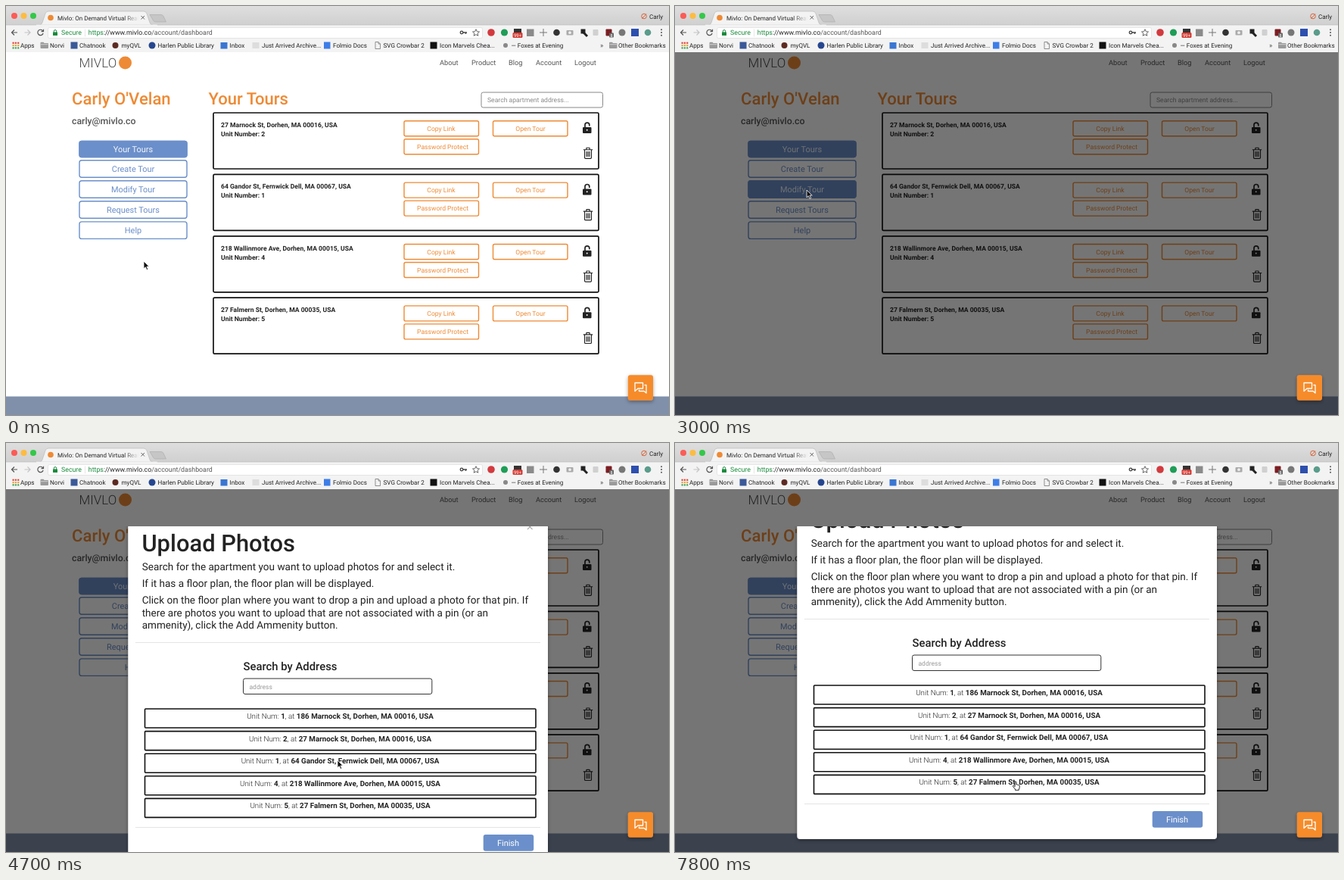
An HTML page for the animation above (7.9 s loop, 876 px wide and 540 px high).

```html
<!DOCTYPE html>
<html lang="en">
<head>
<meta charset="utf-8">
<title>Tour dashboard</title>
<style>
html, body { margin: 0; width: 100%; height: 100%; overflow: hidden; background: #fff; }
svg { display: block; font-family: Roboto, "Open Sans", sans-serif; text-rendering: geometricPrecision; }
</style>
</head>
<body>
<svg id="stage" width="876" height="540" viewBox="0 0 876 540"></svg>
<script>
const LOOP = 7900, STEP = 100;
const ORANGE = '#ee8a35', BLUE = '#6b8fca', INK = '#222', GREY = '#555';

const text = (x, y, size, str, fill = INK, extra = '') =>
  `<text x="${x}" y="${y}" font-size="${size}" fill="${fill}" ${extra}>${str}</text>`;
const rect = (x, y, w, h, fill, extra = '') =>
  `<rect x="${x}" y="${y}" width="${w}" height="${h}" fill="${fill}" ${extra}/>`;
const dot = (x, y, r, fill, extra = '') => `<circle cx="${x}" cy="${y}" r="${r}" fill="${fill}" ${extra}/>`;
const path = (d, stroke, width = 1, extra = '') =>
  `<path d="${d}" fill="none" stroke="${stroke}" stroke-width="${width}" ${extra}/>`;
const at = (x, y, body) => `<g transform="translate(${x} ${y})">${body}</g>`;
const MID = 'text-anchor="middle"';

const tours = [
  { unit: 2, place: '27 Marnock St, Dorhen, MA 00016, USA' },
  { unit: 1, place: '64 Gandor St, Fernwick Dell, MA 00067, USA' },
  { unit: 4, place: '218 Wallinmore Ave, Dorhen, MA 00015, USA' },
  { unit: 5, place: '27 Falmern St, Dorhen, MA 00035, USA' }
];
const photoRows = [{ unit: 1, place: '186 Marnock St, Dorhen, MA 00016, USA' }, ...tours];

// Browser window
const folder = x => at(x, 47.5,
  '<path d="M0 1.2q0-1 1-1h3l1 1.3h4.500q1 0 1 1v5q0 1-1 1h-8.500q-1 0-1-1z" fill="#9a9a9a"/>' +
  path('M.5 3.200h9.500', '#e8e8e8', .7));
const sheet = x => at(x, 47, path('M.5.5h4l2.500 2.500v6.500h-6.500zM4.500.5v2.500h2.500', '#777', .8));

function browser() {
  const lights = ['#fc5b56', '#fdbc40', '#34c849'].map((c, i) => dot(11 + i * 12.5, 13, 4, c)).join('');
  const tabs = '<path d="M190 11.500h15q2 0 3 2l3.500 7.500h-14q-2 0-3-2z" fill="#c6c6c6" stroke="#aaa" stroke-width=".6"/>' +
    '<path d="M44 25q3 0 4-3l4-12q1-3 4-3h126q3 0 4 3l4 12q1 3 4 3z" fill="#f3f3f3" stroke="#b4b4b4" stroke-width=".6"/>' +
    rect(40, 24.7, 160, 2, '#f3f3f3') +
    dot(59, 15.500, 3.8, ORANGE) +
    text(68, 18.500, 8, 'Mivlo: On Demand Virtual Real', 'url(#tabFade)') +
    path('M178.500 13l4.500 4.500m0-4.500l-4.500 4.500', '#666', 1);
  const controls =
    path('M15 35h-7.500m3.500-3.500l-3.500 3.500 3.500 3.500', '#555', 1.2) +
    path('M24.500 35h7.500m-3.500-3.500l3.500 3.500-3.500 3.500', '#c4c4c4', 1.2) +
    path('M48.700 33a3.700 3.700 0 1 0 .4 3M49.500 30.700v3h-3', '#555', 1.200) +
    rect(55.500, 28.500, 574, 14, '#fff', 'rx="2" stroke="#ddd" stroke-width=".7"') +
    rect(62, 34.500, 6, 4.500, '#1a8a3c', 'rx=".6"') + path('M63.300 35v-1.700a1.700 1.700 0 0 1 3.400 0v1.700', '#1a8a3c', 1) +
    text(73, 38.300, 8.8, 'Secure', '#1a8a3c') + path('M104.500 30.500v10', '#ddd', .7) +
    text(108.800, 38.300, 8.8, '<tspan fill="#1a8a3c">https</tspan>://www.mivlo.co<tspan fill="#555">/account/dashboard</tspan>') +
    dot(602, 35, 1.8, 'none', 'stroke="#444" stroke-width="1.300"') + path('M604 35h5m-1.500 0v2', '#444', 1.3) +
    path('M621 30.700l1.300 3 3.200.3-2.400 2.100.7 3.200-2.800-1.700-2.800 1.700.7-3.200-2.400-2.100 3.200-.3z', '#555', .9);
  const extensions =
    dot(641, 35, 4.800, '#d23a3f') + dot(658.500, 35, 4.600, '#1f9d57') +
    rect(671, 30, 10, 6, '#333') + rect(669.500, 35, 13, 7, '#d43b34', 'rx="1.500"') +
    text(676, 41, 6, '99+', '#fff', MID) +
    rect(688, 30.500, 9.500, 9.500, '#8b8b8b') +
    path('M705 35h10m-5-5v10', '#777', 1) +
    dot(727.500, 35, 4.300, '#333') +
    rect(740.500, 32, 9, 6.500, '#aaa', 'rx="1"') + dot(745, 35.200, 1.900, '#eee') +
    rect(759.500, 30.500, 6, 6, '#222') + path('M763 35l5 5', '#222', 3) +
    rect(775.500, 31, 7, 8, '#d0d0d0', 'rx="1"') +
    rect(792.500, 30.500, 8, 9, '#7c1d22', 'rx="1"') + rect(797, 35.500, 6, 6, '#666', 'rx="1"') + text(800, 40.700, 5.500, '8', '#fff', MID) +
    dot(814, 35, 4.500, '#777') + rect(826, 30, 10, 10, '#2d4fae') + dot(848, 35, 4.300, '#5a9c8b') +
    [31.300, 35, 38.700].map(y => dot(866, y, 1, '#555')).join('');
  const appGrid = ['#e04a3f', '#e8a33a', '#48a45a'].map((c, row) =>
    [0, 1, 2].map(col => rect(8.500 + col * 3.300, 47.700 + row * 3.300, 2.200, 2.200, c)).join('')).join('');
  const marks = [[19, 'Apps'], [58, 'Norvi'], [97, 'Chatnook'], [152.500, 'myQVL'], [200.500, 'Harlen Public Library'],
    [295.500, 'Inbox'], [338, 'Just Arrived Archive...'], [432, 'Folmio Docs'], [498.500, 'SVG Crowbar 2'],
    [573, 'Icon Marvels Chea...'], [667.500, '— Foxes at Evening'], [809, 'Other Bookmarks']]
    .map(([x, s]) => text(x, 55, 8.1, s)).join('');
  const icons = folder(45.500) + rect(85.500, 47.500, 9, 9, '#3b5998') + dot(144.500, 52, 4, '#5c2a22') +
    dot(193, 52, 4.500, '#25468f') + rect(283.500, 48, 9, 8.500, '#3a76d2') + rect(325.500, 48, 9, 8, '#ddd') +
    rect(420, 47.500, 8.500, 9, '#3d7de8') + sheet(487.500) + rect(560.500, 47.500, 9, 9, '#111') +
    dot(660, 52, 3, '#888') + text(785, 55, 9, '»', '#444') + folder(797);
  return rect(0, 0, 876, 25, 'url(#titleBar)') + rect(0, 25, 876, 36, '#f3f3f3') +
    path('M0 25h44M198 25h678', '#b8b8b8', .6) + lights + tabs +
    dot(843, 13.500, 3.300, 'none', 'stroke="#d8643c"') + path('M840.500 16.500l5.500-6', '#d8643c', 1) +
    text(850, 16.500, 8, 'Carly') + controls + extensions + appGrid + icons + marks;
}

// Dashboard page
const menu = [['Your Tours', 178.500, 21], ['Create Tour', 203.700, 22.500], ['Modify Tour', 230.700, 22.500],
  ['Request Tours', 257.700, 22.500], ['Help', 284.900, 22.500]];

function menuButton([label, y, h], i) {
  const base = y + h / 2 + 4;
  const box = fill => rect(97, y, 142, h, fill, `rx="3" stroke="${BLUE}" stroke-width="1.400"`);
  return box('#fff') + text(168, base, 10.950, label, BLUE, MID) +
    `<g id="hot${i}" opacity="${i ? 0 : 1}">${box(BLUE)}${text(168, base, 10.950, label, '#f4f7fc', MID)}</g>`;
}

const orangeButton = (x, y, label, cx) =>
  rect(x, y, 98.500, 20, '#fff', `rx="2" stroke="${ORANGE}" stroke-width="1.400"`) + text(cx, y + 13.200, 8.6, label, ORANGE, MID);

const padlock = at(762, 152.500, rect(0, 7.500, 11.500, 8, INK, 'rx="1"') +
  path('M3 8v-3.500a2.900 2.900 0 0 1 5.800 0v1.500', INK, 1.700) + dot(5.700, 11.300, 1, '#fff'));
const trash = at(762.500, 186.500,
  path('M.3 3.200h12.400M4.300 3v-1.700q0-.6.600-.6h3.200q.6 0 .6.600v1.700M2 3.500v10q0 1.300 1.300 1.300h6.400q1.300 0 1.300-1.300v-10M4.500 5.500v7M6.500 5.500v7M8.500 5.500v7', INK, 1.150));

const tourCard = ({ unit, place }, i) => at(0, i * 81.400,
  rect(274, 141, 509, 74, '#fff', 'rx="1.500" stroke="#111" stroke-width="1.700"') +
  text(284, 160, 8.6, place, INK, 'font-weight="700"') +
  text(284, 171.800, 8.6, 'Unit Number: ' + unit, INK, 'font-weight="700"') +
  orangeButton(526, 151.700, 'Copy Link', 575) + orangeButton(526, 175.700, 'Password Protect', 577) +
  orangeButton(643.500, 151.700, 'Open Tour', 693) + padlock + trash);

function dashboard() {
  const nav = [[573, 'About'], [615, 'Product'], [664, 'Blog'], [700, 'Account'], [751, 'Logout']]
    .map(([x, s]) => text(x, 78, 9.250, s, GREY)).join('');
  return rect(0, 61, 876, 479, '#fff') +
    text(96.500, 81, 17, 'MIVLO', '#4a4a4a', 'font-weight="300"') + dot(157.500, 75, 8.500, ORANGE) + nav +
    text(87, 129.500, 22.100, "Carly O'Velan", ORANGE, 'font-weight="500"') +
    text(87, 156, 12.300, 'carly@mivlo.co', GREY, 'font-weight="500"') +
    text(267.500, 129.500, 22.100, 'Your Tours', ORANGE, 'font-weight="500"') +
    rect(628, 114, 160.500, 20, '#fff', 'rx="2.500" stroke="#888" stroke-width="1"') +
    text(636, 127.200, 8.6, 'Search apartment address...', '#8a8a8a') +
    menu.map(menuButton).join('') + tours.map(tourCard).join('') + rect(0, 515.500, 876, 25, '#8090ab');
}

// Upload dialog
const photoRow = ({ unit, place }, i) => at(0, i * 29.600,
  rect(183.500, 392, 516.500, 25, '#fff', 'rx="1" stroke="#111" stroke-width="1.600"') +
  text(441.500, 405, 9.800, `Unit Num: <tspan font-weight="700">${unit}</tspan>, at <tspan font-weight="700">${place}</tspan>`,
    INK, MID + ' font-weight="300"'));

function dialog() {
  const lines = ['Search for the apartment you want to upload photos for and select it.',
    'If it has a floor plan, the floor plan will be displayed.',
    'Click on the floor plan where you want to drop a pin and upload a photo for that pin. If',
    'there are photos you want to upload that are not associated with a pin (or an',
    'ammenity), click the Add Ammenity button.'];
  const baselines = [209, 231, 253.300, 269.500, 285.500];
  return rect(161.300, 129, 554.700, 466, '#fff', 'rx="4" filter="url(#shadow)"') +
    path('M689 148.500l6.500 6.500m0-6.500l-6.500 6.500', '#aaa', 1.100) +
    text(179.500, 184, 30.850, 'Upload Photos', INK, 'font-weight="500"') +
    lines.map((s, i) => text(179.700, baselines[i], 13.560, s)).join('') +
    path('M171 304.500h535M171 548.500h535', '#e4e4e4', 1) +
    text(313.500, 341, 14.850, 'Search by Address', INK, 'font-weight="500"') +
    rect(313.500, 352, 249.300, 20.500, '#fff', 'rx="2.500" stroke="#333" stroke-width="1"') +
    text(321.500, 365.700, 8.500, 'address', '#999') +
    photoRows.map(photoRow).join('') +
    rect(630.700, 558, 66.500, 21.800, BLUE, 'rx="3"') + text(663.500, 573, 10.950, 'Finish', '#fff', MID);
}

const chat = rect(821.800, 487.300, 33.200, 33.400, '#f68b2c', 'rx="3" filter="url(#shadow)"') +
  path('M831 497.500h10.500v7.500h-6.500l-4 3.500zM843.500 500.500h2.500v10.500l-3-2.500h-6.500v-2', '#fff', 1.300, 'stroke-linejoin="round"');
const arrow = '<path id="arrow" d="M0 0v9.800l2.300-2.100 1.700 3.700 1.700-.8-1.700-3.600h3.200z" fill="#111" stroke="#fff" stroke-width=".8"/>';
const hand = '<path id="hand" d="M-.9 1q0-1.100.9-1.100t1 1.100v3q.9-.5 1.500.3.900-.4 1.400.4 1.300-.2 1.300 1.100v2q0 1.400-.9 2.200v1.300h-4.800v-1.200l-3-3.600q-.4-1 .7-1.200l1.900 1.300z" fill="#fff" stroke="#111" stroke-width=".9" stroke-linejoin="round"/>';

const stage = document.getElementById('stage');
stage.innerHTML = `<defs>
  <linearGradient id="titleBar" x2="0" y2="1"><stop stop-color="#dedede"/><stop offset="1" stop-color="#d0d0d0"/></linearGradient>
  <linearGradient id="tabFade" gradientUnits="userSpaceOnUse" x1="155" x2="175"><stop stop-color="#222"/><stop offset="1" stop-color="#222" stop-opacity="0"/></linearGradient>
  <filter id="shadow" x="-20%" y="-20%" width="140%" height="140%"><feDropShadow dx="0" dy="2" stdDeviation="2.500" flood-opacity=".35"/></filter>
  <clipPath id="viewport"><rect y="110" width="876" height="430"/></clipPath></defs>` +
  dashboard() + `<rect id="shade" y="61" width="876" height="479"/>` +
  `<g clip-path="url(#viewport)"><g id="dialog">${dialog()}</g></g>` + chat + browser() +
  `<g id="cursor">${arrow}${hand}</g>`;
const $ = id => document.getElementById(id);

// Keyframes: time followed by values, eased between neighbours
const cursorKeys = [[800, 182, 337], [1300, 177, 276], [1600, 175, 261], [1700, 175, 252], [2000, 174, 243],
  [3300, 174, 243], [4100, 438, 419], [5700, 438, 419], [6200, 432, 348], [6500, 432, 348], [7400, 450, 447]];
const scrollKeys = [[4100, 0], [4700, 41], [4900, 41], [5800, 72]];
const shadeKeys = [[2800, 0], [3000, .54]];
const showKeys = [[3000, 0, -60], [3200, 1, 0]];

function track(keys, t) {
  const next = keys.findIndex(k => k[0] > t);
  if (next === 0) return keys[0].slice(1);
  if (next < 0) return keys[keys.length - 1].slice(1);
  const a = keys[next - 1], b = keys[next], p = (t - a[0]) / (b[0] - a[0]);
  const eased = p * p * (3 - 2 * p);
  return a.slice(1).map((v, i) => v + (b[i + 1] - v) * eased);
}

function hoveredMenu(t) {
  if (t > 2900) return -1;
  const y = track(cursorKeys, t)[1];
  return menu.findIndex(([, top, h]) => y >= top && y <= top + h);
}

function overPhotoRow(t, y, scroll) {
  const inList = y + scroll - 392;
  const settled = (t > 3300 && t < 4100) || t > 6400;
  return settled && inList >= 0 && inList < 148 && inList % 29.600 < 25;
}

function render(t) {
  const [x, y] = track(cursorKeys, t), [scroll] = track(scrollKeys, t);
  const [opacity, slide] = track(showKeys, t);
  for (let i = 1; i < menu.length; i++) {
    const lit = [100, 150, 200].filter(lag => hoveredMenu(t - lag) === i).length;
    $('hot' + i).setAttribute('opacity', lit / 3);
  }
  $('shade').setAttribute('opacity', track(shadeKeys, t)[0]);
  $('dialog').setAttribute('opacity', opacity);
  $('dialog').setAttribute('transform', `translate(0 ${slide - scroll})`);
  const pointing = hoveredMenu(t) >= 0 || overPhotoRow(t, y, scroll);
  $('hand').setAttribute('visibility', pointing ? 'visible' : 'hidden');
  $('arrow').setAttribute('visibility', pointing ? 'hidden' : 'visible');
  $('cursor').setAttribute('transform', `translate(${x} ${y})`);
}

const start = performance.now();
function frame() {
  const t = (performance.now() - start) % LOOP;
  render(Math.floor(t / STEP) * STEP);
  requestAnimationFrame(frame);
}
frame();
</script>
</body>
</html>
```
